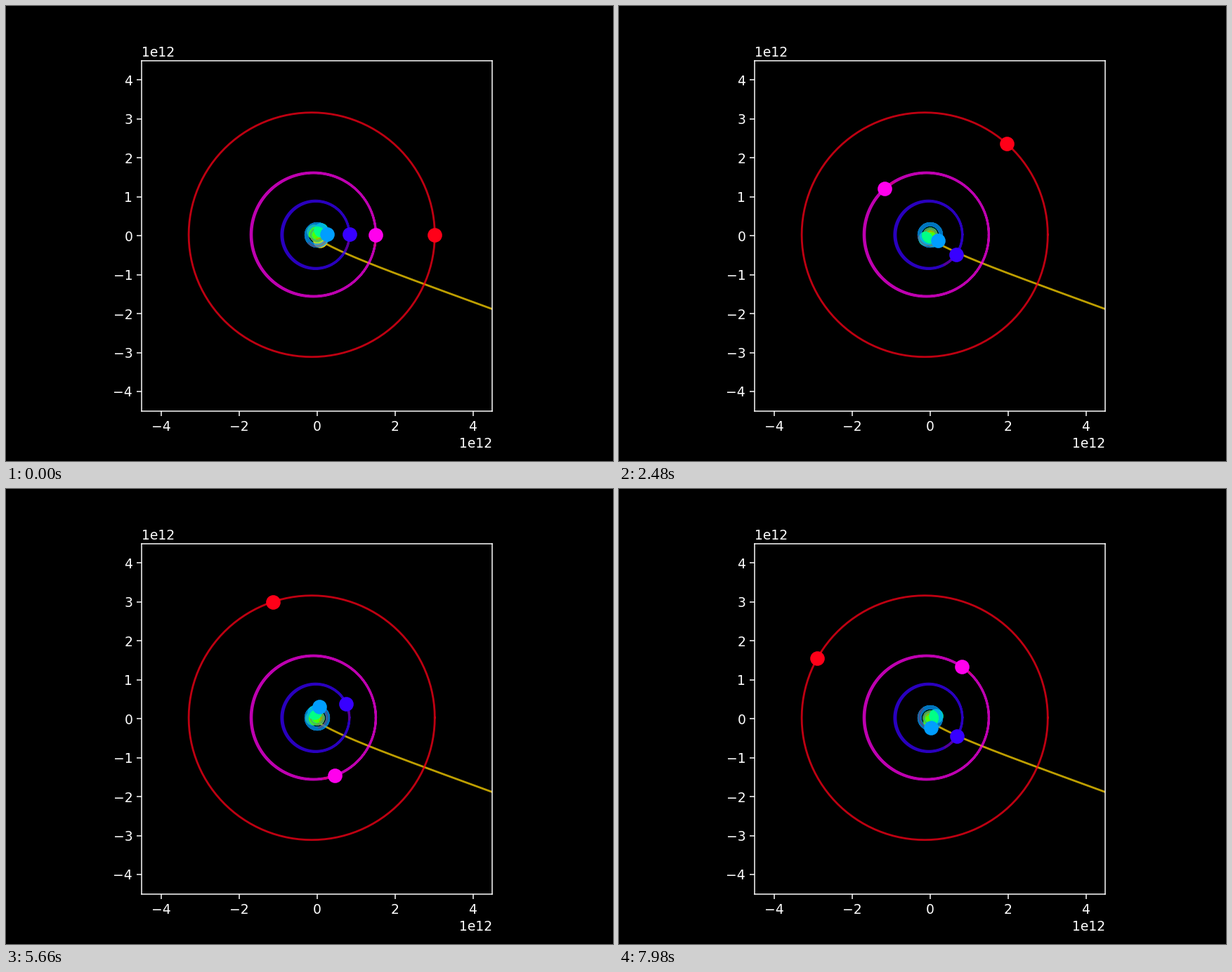
A matplotlib script that plays this animation: 864x648 px, repeating every 8000 ms.

```python
import numpy as np
import matplotlib.pyplot as plt
from matplotlib.animation import FuncAnimation

FRAMES, STEP = 400, 20          # 8000 ms per loop
UNIT = 9e12 / 498.96            # metres per pixel
TAIL_MS = 200
FOCUS = np.array([0.2, 1.2])
TURN = np.linspace(0, 2 * np.pi, 121)


def outer(center, a, b, rate, start, swing, tilt):
    """Near-circular orbit whose angle runs unevenly (degrees, ms)."""
    def place(t):
        m = np.radians(rate * t)
        phi = np.radians(rate * t + start + swing * np.sin(m) + tilt * np.cos(m))
        return center[0] + a * np.cos(phi), center[1] + b * np.sin(phi)
    return place


def inner(r, e, rate, start, w0=0.0, drift=0.0):
    """Small eccentric orbit whose perihelion slowly turns."""
    def place(t):
        m = start + rate * t
        w = w0 + drift * t
        theta = np.radians(m + np.degrees(2 * e) * np.sin(np.radians(m - w)))
        rad = r / (1 + e * np.cos(theta - np.radians(w)))
        return FOCUS[0] + rad * np.cos(theta), FOCUS[1] + rad * np.sin(theta)
    return place


def escape_curve(d):
    return 4.2 + d, -(14.9 + 0.365 * d - 8 * np.exp(-d / 40))


def escape(t):
    return escape_curve(130 * (np.maximum(t, 0) / 820) ** 0.817)


def ellipse_trail(center, a, b, spread, turns):
    """Several turns, widest apart on the left side."""
    xs, ys = [], []
    for u in np.linspace(-spread, spread, turns):
        grow = u * (0.65 - 0.35 * np.cos(TURN))
        xs.append(center[0] + (a + grow) * np.cos(TURN))
        ys.append(center[1] + (b + grow) * np.sin(TURN))
    return np.concatenate(xs), np.concatenate(ys)


def ring_trail(r, e, turns):
    """Turning ellipses that fill a ring."""
    theta = np.linspace(0, 2 * np.pi * turns, 50 * turns)
    rad = r / (1 + e * np.cos(theta * (1 - 1 / turns)))
    return FOCUS[0] + rad * np.cos(theta), FOCUS[1] + rad * np.sin(theta)


def escape_trail():
    x, y = ring_trail(4, 0.25, 6)
    ex, ey = escape_curve(np.linspace(0, 330, 60))
    return np.append(x, ex), np.append(y, ey)


def still(t):
    return FOCUS[0] + 0 * t, FOCUS[1] + 0 * t


C5, C6, C7 = (-2.0, 1.4), (-5.1, 1.7), (-7.6, 1.5)
BODIES = [
    (still, None),
    (escape, escape_trail()),
    (inner(6.4, 0.08, 2.68, 130), ring_trail(6.4, 0.08, 8)),
    (inner(8.8, 0.05, 1.665, 50), ring_trail(8.8, 0.05, 8)),
    (inner(15.1, 0.1, 0.71, 10, 30, -0.013), ring_trail(15.1, 0.1, 16)),
    (outer(C5, 47.9, 48, 0.1312, 2.1, 3.2, -1.2),
     ellipse_trail(C5, 47.9, 48, 1.1, 3)),
    (outer(C6, 88.7, 88, 0.0517, 0.65, 3.6, -0.7),
     ellipse_trail(C6, 88.7, 88, 0.9, 3)),
    (outer(C7, 175.1, 174, 0.01875, 0, 2.5, 0),
     ellipse_trail(C7, 175.1, 174, 0, 1)),
]

plt.style.use("dark_background")
fig, ax = plt.subplots(figsize=(6.4, 4.8), dpi=135)
ax.set_aspect("equal")
ax.set_xlim(-4.5e12, 4.5e12)
ax.set_ylim(-4.5e12, 4.5e12)

movers = []
for (place, trail), color in zip(BODIES, plt.cm.hsv(np.linspace(0, 1, len(BODIES)))):
    if trail is not None:
        ax.plot(trail[0] * UNIT, trail[1] * UNIT, color=color, lw=1.5, alpha=0.75)
    tail, = ax.plot([], [], color="red", lw=1.5, alpha=0.25)
    dot, = ax.plot([], [], "o", color=color, ms=10)
    movers.append((place, tail, dot))


def update(i):
    t = i * STEP + np.linspace(-TAIL_MS, 0, 21)
    changed = []
    for place, tail, dot in movers:
        x, y = place(t)
        tail.set_data(x * UNIT, y * UNIT)
        dot.set_data([x[-1] * UNIT], [y[-1] * UNIT])
        changed += [tail, dot]
    return changed


anim = FuncAnimation(fig, update, frames=FRAMES, interval=STEP,
                     repeat=True, repeat_delay=0)
plt.show()
```
